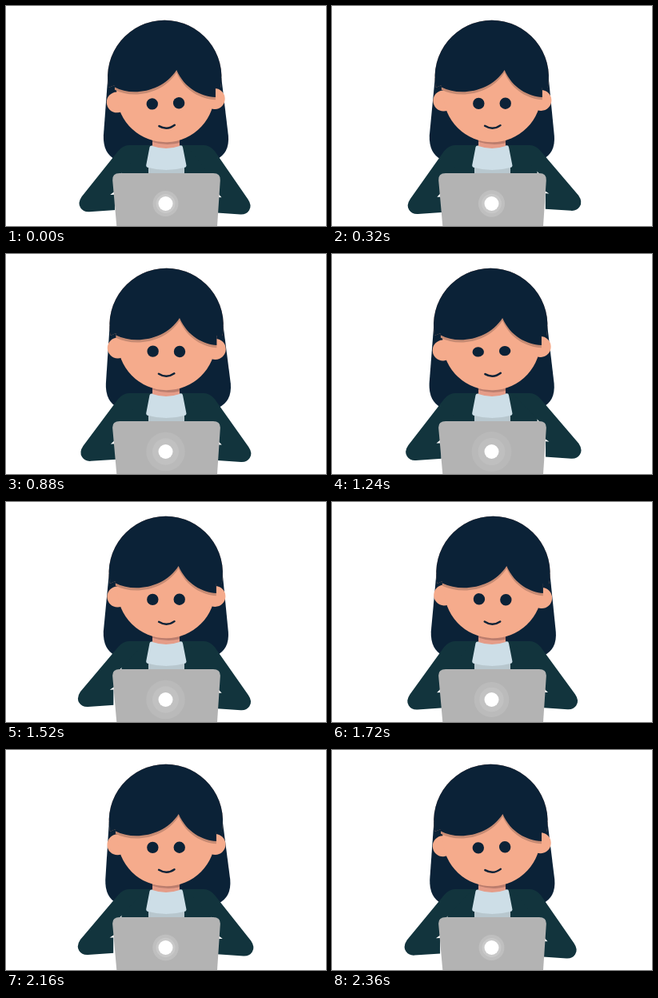
Recreate the animation shown at these times as an HTML page. Size 400 by 275 pixels, loop 2.4 s.

```html
<!DOCTYPE html>
<html lang="en">
<head>
<meta charset="utf-8">
<title>Working at a laptop</title>
<style>
  html, body { margin: 0; width: 100%; height: 100%; overflow: hidden; background: #fff; }
  svg { display: block; width: 100vw; height: 100vh; }
  .hair { fill: #0b2237; }
  .skin { fill: #f5ab8c; }
  .shade { fill: #c78b73; }
  .coat { fill: #12343d; }
  .gap { fill: #fff; }
</style>
</head>
<body>
<svg viewBox="0 0 400 275">
  <defs>
    <clipPath id="neckClip"><path d="M183 160H217V175Q200 181 183 175Z"/></clipPath>
  </defs>

  <path id="back" class="hair"/>

  <path class="coat" d="M145 180Q148 174 155 174H246Q253 174 256 180L258 275H143Z"/>
  <path fill="#b8c7ce" d="M178 198H223V212H178Z"/>
  <path fill="#cddee7" d="M179.500 176.500Q180 174 183 174.500H217Q220.500 173.500 221 176.500L225.500 199.500Q225.500 201.500 223 202Q200 208 178 202Q175 201.500 175.200 199Z"/>
  <path fill="#e59c88" d="M183 160H217V175Q200 181 183 175Z"/>
  <g clip-path="url(#neckClip)">
    <circle id="neckShade" cx="203" cy="112" r="61" fill="#bb7d6d"/>
  </g>

  <path id="armL" class="coat"/>
  <path id="gapL" class="gap"/>
  <g transform="translate(401 0) scale(-1 1)">
    <path id="armR" class="coat"/>
    <path id="gapR" class="gap"/>
  </g>

  <g id="head">
    <circle class="skin" cx="139.500" cy="118.200" r="13"/>
    <circle class="skin" cx="261.500" cy="118.200" r="13"/>
    <circle class="skin" cx="200.500" cy="109" r="61.200"/>
    <ellipse id="eyeL" class="hair" cx="183.400" cy="121.800" rx="7.200"/>
    <ellipse id="eyeR" class="hair" cx="216.800" cy="121.800" rx="7.200"/>
    <path d="M191 149.800Q201 156 210.500 149.200" fill="none" stroke="#0b2237" stroke-width="2.400" stroke-linecap="round"/>
  </g>
  <path id="fringeShade" class="shade"/>
  <path id="fringe" class="hair"/>

  <path fill="#b3b3b3" d="M142 209H259Q268.500 209 267.800 218L264 275H138.300L133.200 218Q132.500 209 142 209Z"/>
  <g fill="#fff">
    <circle id="glowOut" cx="199.500" cy="247"/>
    <circle id="glowIn" cx="199.500" cy="247"/>
    <circle cx="199.500" cy="247" r="9"/>
  </g>
</svg>
<script>
  const LOOP = 2400, STEP = 40;
  const $ = id => document.getElementById(id);
  const set = (id, attrs) => {
    for (const k in attrs) $(id).setAttribute(k, attrs[k]);
  };
  // Cosine wave that peaks at time `peak`
  const wave = (t, period, peak) => Math.cos((t - peak) / period * 2 * Math.PI);
  const mix = (a, b, k) => a + (b - a) * k;
  const smooth = k => k * k * (3 - 2 * k);

  // Front hair: round crown at cx, parting at px, hem ends shifted by e
  const fringePath = (cx, px, e, drop) =>
    `M${cx - 70} 102A71.2 71.2 0 1 1 ${cx + 70} 102H${263 + e}V${114 + drop}` +
    `C${px + 30} ${113 + drop} ${px + 10} ${103 + drop} ${px} ${80 + drop}` +
    `C${px - 18} ${108 + drop} ${px - 56} ${113 + drop} ${137 + e} ${101.5 + drop}V99Z`;

  const backPath = (top, low) =>
    `M${129 + top} 90L${123.2 + low} 162Q${122.5 + low} 184 ${138 + low} 192` +
    `H${264 + low}Q${281 + low} 184 ${279.2 + low} 162L${271 + top} 90Z`;

  // The shoulder stays put while the forearm slides by (x, y)
  const armPath = (x, y) =>
    `M154 174Q146 174 140 181.500L${95.5 + x} ${239 + y}Q${90 + x} ${247 + y} ${94 + x} ${253 + y}` +
    `Q${97.5 + x} ${258.5 + y} ${105 + x} ${258 + y}L${145 + x} ${255.3 + y}V209L176 174Z`;

  const gapPath = (x, y) =>
    `M${130.5 + x / 3} ${236.7 + y}L139 ${229.5 + y / 2}H150V${262 + y}H${136.8 + x}V${236.5 + y}Z`;

  function moveArm(side, w) {
    const x = 3.1 * w, y = 2.5 * w;
    set('arm' + side, { d: armPath(x, y) });
    set('gap' + side, { d: gapPath(x, y) });
  }

  // Eyes close briefly once per loop
  function eyeOpen(t) {
    const k = (t - 1210) / 220;
    return k > 0 && k < 1 ? 1 - 0.9 * Math.sin(Math.PI * k) ** 2 : 1;
  }

  function draw(t) {
    const sway = wave(t, 1200, 645);
    const lag = wave(t, 1200, 765);
    const turn = `rotate(${2.1 * sway} 200 140)`;
    const crown = 200 + 1.8 * sway, part = 216 + 2.9 * sway;

    set('head', { transform: turn });
    set('neckShade', { transform: turn });
    set('fringe', { d: fringePath(crown, part, 1.1 * sway, 0) });
    set('fringeShade', { d: fringePath(crown, part, 1.1 * sway, 3.2) });
    set('back', { d: backPath(1.8 * sway, 2 * lag) });

    const ry = 7.2 * eyeOpen(t);
    set('eyeL', { ry });
    set('eyeR', { ry });

    moveArm('L', wave(t, 800, 235));
    moveArm('R', wave(t, 800, -10));

    const k = smooth((1 + wave(t, LOOP, LOOP / 2)) / 2);
    set('glowOut', { r: mix(16, 25, k), opacity: mix(0.16, 0.08, k) });
    set('glowIn', { r: mix(12, 17, k), opacity: mix(0.16, 0.09, k) });
  }

  const start = performance.now();
  function tick() {
    const t = (performance.now() - start) % LOOP;
    draw(Math.floor(t / STEP) * STEP);
    requestAnimationFrame(tick);
  }
  draw(0);
  requestAnimationFrame(tick);
</script>
</body>
</html>
```
